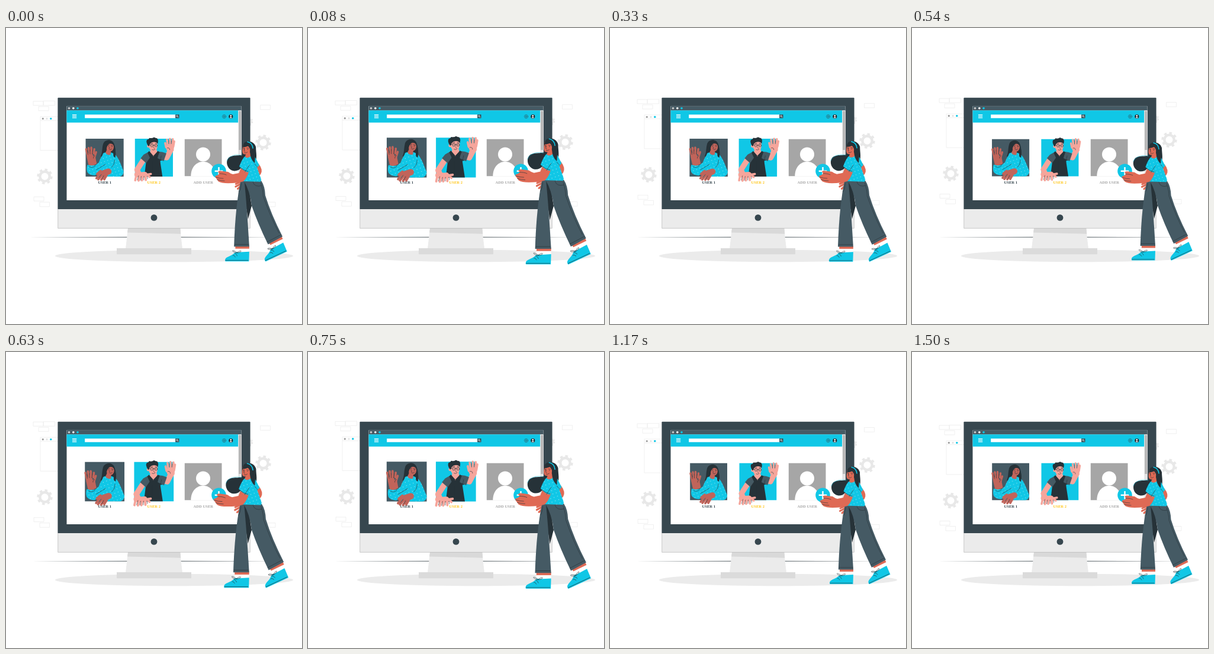
An HTML page that plays this animation: 500x500 px, repeating every 1.54 s.

```html
<!DOCTYPE html>
<html lang="en">
<head>
<meta charset="utf-8">
<title>Add user</title>
<style>
  html, body { margin: 0; width: 100%; height: 100%; overflow: hidden; background: #fff; }
  svg { display: block; width: 100%; height: 100%; }
  text { font: bold 6.6px "Liberation Serif", "Times New Roman", serif; text-anchor: middle; }
  .cyan { fill: #10c7e6; } .slate { fill: #455a64; } .dark { fill: #263238; } .frame { fill: #37474f; }
  .line { fill: none; stroke: #263238; stroke-width: .6; stroke-linecap: round; stroke-linejoin: round; }
  .pale { fill: none; stroke: #ececec; stroke-width: .8; }
  .limb { fill: none; stroke-linecap: round; stroke-linejoin: round; }
  .brown { fill: #c1645a; } .limb.brown { fill: none; stroke: #c1645a; }
  .pink { fill: #f6a59b; } .limb.pink { fill: none; stroke: #f6a59b; }
  .coral { fill: #df6a55; } .limb.coral { fill: none; stroke: #df6a55; }
  .dots { fill: url(#dots); }
</style>
</head>
<body>
<svg viewBox="0 0 500 500">
  <defs>
    <pattern id="dots" width="8" height="8" patternUnits="userSpaceOnUse" patternTransform="rotate(25)">
      <rect width="8" height="8" fill="#10c7e6"/>
      <circle cx="2" cy="2" r=".5" fill="#fff"/><circle cx="6" cy="6" r=".5" fill="#fff"/>
    </pattern>
    <g id="gear" fill="none" stroke="#e8e8e8">
      <circle r="8.2" stroke-width="4.4"/>
      <circle r="11.2" stroke-width="4" pathLength="16" stroke-dasharray="1 1"/>
    </g>
    <g id="shoe">
      <path fill="#fff" d="M17 -6H40V2H17z"/>
      <path class="cyan" d="M0 15C0 9 10 9 15 3.500Q18 .5 22 2L40 1L39.500 17H1Q-.3 17 0 15z"/>
      <path class="line" d="M1 15.300H38M13 7Q15 6 17 10M16 4Q18 3 20 8M20 3C11 -5 9 1 19 3C28 -4 30 2 20 3"/>
    </g>
  </defs>

  <ellipse cx="284" cy="385" rx="201" ry="10.200" fill="#ebebeb"/>
  <path class="dark" d="M38 353.300L250 352.800L462 353.300L250 353.800z"/>

  <g id="floating">
    <use href="#gear" x="65.500" y="251"/>
    <use href="#gear" x="434.500" y="193.800"/>
    <use href="#gear" transform="translate(409.500 158.300) scale(.58)"/>
    <path class="pale" d="M46 124h17v7h-17zM63 123.500h19.500v7.500H63zM55 133h17v7H55zM47 285.500h17v7H47zM57 294.500h16.500v7.500H57zM429.500 130.500h17v7.500h-17zM438 294.500h17v7.500h-17zM58 150h50v57H58zM58 156.500h50"/>
    <circle cx="62.300" cy="153.400" r="1.600" fill="#9a9a9a"/>
    <circle cx="69" cy="153.400" r="1.600" fill="#e2e2e2"/>
    <circle class="cyan" cx="75.800" cy="153.400" r="1.700"/>
  </g>

  <!-- monitor -->
  <path fill="#ebebeb" d="M206 338H294L298 373H202z"/>
  <path fill="#d9d9d9" d="M206 338H294.500L295.300 347.800L205 345.500z"/>
  <path fill="#dbdbdb" d="M187 372H313V382.300H187z"/>
  <path fill="#ebebeb" stroke="#aaa" stroke-width=".6" d="M87.700 305H412.300V338.300H87.700z"/>
  <rect class="frame" x="87.400" y="117.800" width="325.200" height="188.200" rx="1"/>
  <circle class="frame" cx="250" cy="320.400" r="5.400"/>
  <path fill="#fff" d="M102.500 132H397.700V291H102.500z"/>
  <path class="slate" stroke="#8a979d" stroke-width=".4" d="M102.500 132H397.700V139.300H102.500z"/>
  <circle cx="106.500" cy="135.600" r="1.800" fill="#c7c7c7"/>
  <circle cx="113.800" cy="135.600" r="1.800" fill="#fff"/>
  <circle class="cyan" cx="121" cy="135.600" r="1.800"/>
  <path class="cyan" d="M102.500 139.300H392.300V159.700H102.500z"/>
  <path fill="#e3e3e3" d="M392.300 139.300H397.700V291H392.300z"/>
  <path fill="#b4b4b4" d="M393.300 140.300H397V206H393.300z"/>
  <path stroke="#fff" stroke-width="1.200" d="M112 146.600H119.200M112 149.100H119.200M112 151.600H119.200"/>
  <path fill="#fff" d="M133.200 146.200H286.500V152.300H133.200z"/>
  <path class="frame" d="M286.200 146.200H292.500V152.300H286.200z"/>
  <g fill="none" stroke="#fff" stroke-width=".7"><circle cx="289" cy="148.800" r="1.300"/><path d="M290 149.800L291.500 151.300"/></g>
  <g fill="none" stroke="#37474f" stroke-width=".8"><circle cx="368.500" cy="149.500" r="3" stroke-dasharray="1.600 .5"/><circle cx="368.500" cy="149.500" r="1.200"/></g>
  <circle class="dark" cx="379.800" cy="149.500" r="3.600"/>
  <path fill="#fff" d="M378.500 148.300a1.300 1.500 0 1 1 2.600 0a1.300 1.500 0 1 1 -2.600 0M377.600 152.200Q379.800 148.300 382 152.200z"/>
  <text class="frame" x="166.800" y="263">USER 1</text>
  <text x="249.800" y="263" fill="#ffc61a">USER 2</text>
  <text x="333.300" y="263" fill="#a6a6a6">ADD USER</text>
  <path fill="#a6a6a6" d="M301.800 187.800H364.500V250.300H301.800z"/>
  <circle cx="333" cy="213.600" r="12" fill="#fff"/>
  <path fill="#fff" d="M312.300 250.400C312.300 217.500 353.700 217.500 353.700 250.400z"/>
  <circle class="cyan" cx="359.500" cy="241.800" r="12.300"/>
  <path stroke="#fff" stroke-width="2.400" d="M352.700 241.800H366.300M359.500 235V248.600"/>

  <!-- waving woman -->
  <g class="beat" data-center="165.500 221">
    <path class="slate" d="M135.200 187.800H198V250.300H135.200z"/>
    <path class="dark" d="M166 193C171 188 180 190 182 196C184 204 186 211 184 220L176 223L160 217C163 210 162 206 163.500 199Q164 195 166 193z"/>
    <path class="dots" d="M164 212C170 208 178 210 183 213C189 218 193 229 198 242Q198 248 192 250.300H157L159 228z"/>
    <path class="brown" d="M169 198Q169 193 175 193Q182 194 182 201Q181 208 177 208.500L176.500 214Q171 216 168 211L170 206z"/>
    <path class="dark" d="M167 211C161 202 166 190 174 190C182 191 184 200 184.500 207Q185 215 184 219Q180 218 181 211Q183 203 181 198Q177 194 173 197Q169 202 170 206z"/>
    <path class="dots" d="M166 212Q161 216 157 227L151 232L138 231Q136 237 138 243Q141 248 150 248.500Q164 244 170 229z"/>
    <path class="limb brown" stroke-width="9" d="M142.500 215L146.500 227"/>
    <path class="limb brown" stroke-width="3.400" d="M138.500 216L136 205M142 212L140 203M145 211L144.500 202.500M148.500 212L149.500 205M150 218L152.500 210"/>
    <path class="brown" d="M136.800 217L151 216L153.500 229Q147 234 140 231z"/>
    <path class="line" stroke-width=".5" d="M139 214L138 207M142.500 213L142.200 206M146.300 213L147 206M148 220Q148 216 150.500 216"/>
    <path class="dots" d="M181 224Q179 237 169 240L176 249Q195 248 197 239z"/>
    <path class="limb brown" stroke-width="10" d="M173 242L164 245"/>
    <path class="limb brown" stroke-width="3.600" d="M161 243L153 253M164 246L156 255M167 248L161 255.500M170 248L166 255M160 241L154 246"/>
    <path class="line" d="M153 239L168 230M183 223Q183 231 178 235M157 252L161 247M162 254L165 249M141 234Q146 237 151 233M174.500 202L174 204M172 198.500L174.500 198M177.500 198.700L180 199.500M174.500 205.500Q177 206.500 178.500 204.500"/>
    <circle class="dark" cx="173.300" cy="200.500" r=".6"/><circle class="dark" cx="178.700" cy="200.800" r=".6"/>
  </g>

  <!-- waving man -->
  <g class="beat" data-center="251 221">
    <path class="cyan" d="M218.500 187.800H281.300V250.300H218.500z"/>
    <path class="limb pink" stroke-width="9" d="M264 217L271 219L278 206"/>
    <path class="limb pink" stroke-width="3.400" d="M270 202L268.500 195M273 199L271.500 189.500M276.500 198L276.300 188M280 198L281 188.500M282 201L283.500 192"/>
    <path class="pink" d="M268.500 200L273 197L283.500 197L282.500 208L272 209z"/>
    <path class="limb pink" stroke-width="9" d="M233 222L222 239L225 246"/>
    <path class="dark" d="M241 210L258 209L268 213L263 224L260 224L264 250.300H234L237 226z"/>
    <path class="slate" d="M257 209Q264 209 270.500 212L266 225L256 220zM242 209L233 214L228 220L237 228L244 218z"/>
    <path class="pink" d="M244 206L254.500 206L255.500 211L249 217L243.500 211z"/>
    <path class="dark" d="M242 208L249 216L244.500 222L239.500 211zM256.500 208L249 216L255 221L259 210z"/>
    <path class="pink" d="M241 195Q241 189 248 189Q256 190 256 198Q255 208 250 209.500Q243 208 241 200z"/>
    <ellipse class="pink" cx="240.500" cy="200" rx="2" ry="2.500"/>
    <path class="dark" d="M240.500 200Q236 193 238.500 189.500Q241.500 189 242.500 186.500Q247 187.500 250 185.300Q253 187 255 187Q258 190 256 196Q253 191.500 246 194Q242.500 196 242 200z"/>
    <path class="limb pink" stroke-width="9" d="M222 247Q228 248 235 247"/>
    <path class="limb pink" stroke-width="3.600" d="M221 247L219 256.500M227 248L224.500 257M231 249L230 256.500M236 249L236.500 256M239 247L245 246M239 248L243 251"/>
    <path class="line" d="M222.500 256L224.500 249M227.500 256.500L229 250M233 256L233.500 250M239 250L239.500 254M274.500 196L274.300 190.500M278.500 196L279 191M272 203Q276 202 276 206M247 226V249M262 216L259 230M249.500 202L250.500 204M247 206Q250 207.500 252 205M245 196L248 195.300M252 195.300L254.500 196"/>
    <g class="line" stroke-width=".5"><circle cx="246.800" cy="199" r="2.400"/><circle cx="253.300" cy="199" r="2.300"/><path d="M241 198L244.300 198.500M249.300 198.500H251"/></g>
    <circle class="dark" cx="247" cy="199" r=".6"/><circle class="dark" cx="253" cy="199" r=".6"/>
  </g>

  <!-- woman with the add button -->
  <g class="beat" data-center="415.500 293">
    <path class="dark" d="M404 213C398 220 384 214 376.500 221C371 228 375 241 386 242.500C395 243 399 237 404 226z"/>
    <path class="limb" stroke="#10c7e6" stroke-width=".5" d="M399 217C390 214 377 217 374 226"/>
    <path class="limb coral" stroke-width="7" d="M424 233Q430 241 427 246"/>
    <path class="limb coral" stroke-width="3" d="M398 260L389 264M397 264L388.500 268.500M397 268L392 272"/>
    <use href="#shoe" x="371" y="375"/>
    <use href="#shoe" transform="translate(430.500 377) rotate(-25)"/>
    <path class="coral" d="M388 366H411V371H388zM443 361L464 350L466.500 355L446 365z"/>
    <path class="dark" d="M400 261L408 261L415 300L409 322z"/>
    <path class="slate" d="M397 258L403 260Q407 300 411 367.500H385.800Q388 300 397 258z"/>
    <path class="slate" d="M402 259L431 259Q437 268 437.500 283Q447 314 466 351L442 364Q425 329 415 300Q412 275 402 259z"/>
    <path class="line" d="M387 364H410M440.500 360L463.500 348M417 261Q420 270 431 267M430 263Q434 275 434 284Q446 319 460 345M394 277Q397 274 398 263"/>
    <path class="dark" d="M404 198C408 192 419 193 422 203C422 214 425 220 420 232L410 231L405 211z"/>
    <path class="dots" d="M403 219Q412 215 421 220L427.500 233L424 237L431 257L429.500 260.500L396.500 259.500L397 240z"/>
    <path class="coral" d="M400 203Q400 197 406 196Q413 197 413 205L412 211L414 218Q408 223 404 219L405.500 215Q400 216 399.500 210z"/>
    <path class="dark" d="M400 203.500Q400 194 410 193.500Q420 195 421.500 208L420 230Q412 222 412.500 211Q413 205 409 201.500Q404 203.500 400 203.500z"/>
    <path class="limb" stroke="#10c7e6" stroke-width="1.500" d="M408 194.500Q416 196 417 205"/>
    <path class="coral" d="M398 236L411 242Q407 255 401 260Q391 263 376 263Q365 263 360 260L355 253Q354 250 358 250L362 247L359.500 244.500Q360 242 364 242.500L376 244Q380 247 384 248L394 246z"/>
    <path class="dots" d="M403 219Q399 223 394.500 235Q401 243 409.500 245L416 229z"/>
    <path class="line" d="M356 253Q362 255 368 255M358 257Q364 259 370 259M361 247Q369 247 373 249M396 237Q402 242 409 243.500M411 233L404 244M424 236L420 231M402.500 205V207M400.500 204.500L403 205M407 204.500L410 205M403 207L402.300 209.500L404 210M403 212.500Q406 213.500 408 211.500"/>
    <circle class="dark" cx="402.700" cy="206.500" r=".6"/><circle class="dark" cx="408.500" cy="206.800" r=".6"/>
  </g>
</svg>
<script>
const LOOP = 1540, LEAD = 33, SECOND_BEAT = 566;
const floating = document.getElementById('floating');
const beating = [...document.querySelectorAll('.beat')].map(node => {
  const [x, y] = node.dataset.center.split(' ').map(Number);
  return { node, x, y };
});

// Quick linear rise, slower linear fall
const pulse = time => Math.max(0, Math.min(time / 155, 1 - (time - 155) / 285));

function draw(now) {
  const phase = (now + LEAD) % LOOP;
  const scale = 1 + .1 * Math.max(pulse(phase), pulse(phase - SECOND_BEAT));
  const lift = 6.7 * (1 - Math.abs(2 * phase / LOOP - 1));
  floating.setAttribute('transform', `translate(0 ${-lift})`);
  for (const { node, x, y } of beating)
    node.setAttribute('transform', `translate(${x} ${y}) scale(${scale}) translate(${-x} ${-y})`);
}

const start = performance.now();
function tick() {
  draw(performance.now() - start);
  requestAnimationFrame(tick);
}
tick();
</script>
</body>
</html>
```
